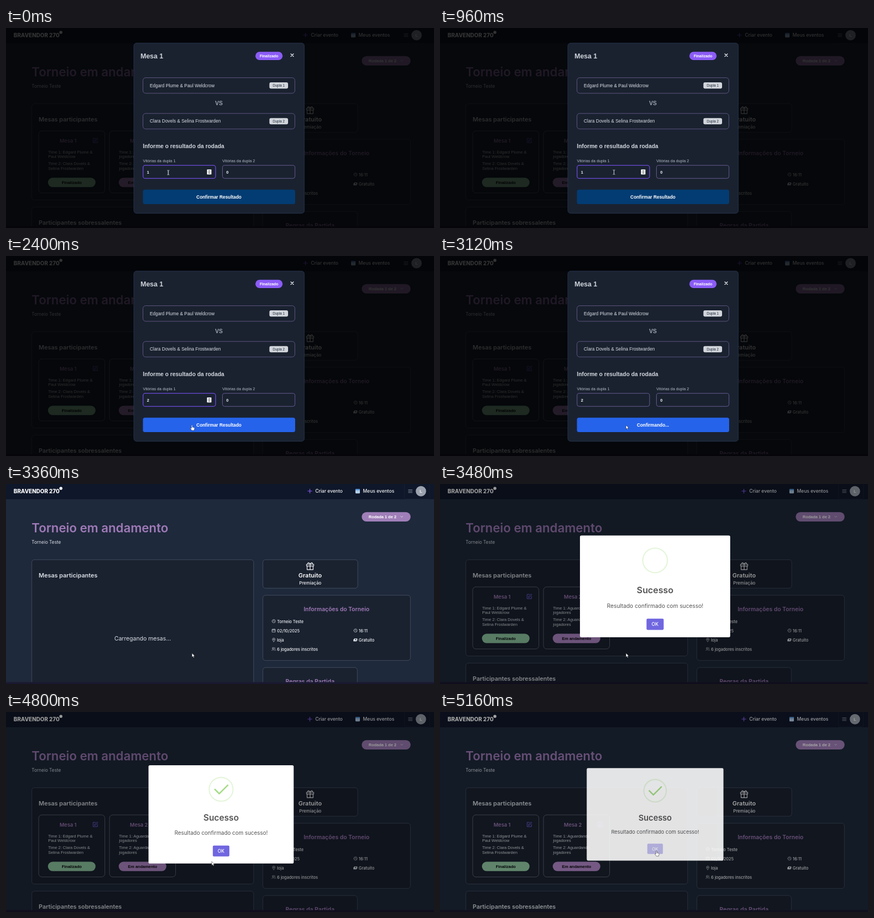
An HTML page for the animation above (5280 ms loop, 786 by 368 pixels).

```html
<!DOCTYPE html>
<html lang="pt-BR">
<head>
<meta charset="utf-8">
<title>Resultado da mesa</title>
<style>
html, body { margin: 0; width: 100%; height: 100%; overflow: hidden; background: #1e293b; }
svg { display: block; width: 100vw; height: 100vh; }
text { white-space: pre; }
.p { font-family: Inter, "Open Sans", sans-serif; }
.a { font-family: "Liberation Sans", Arial, sans-serif; }
</style>
</head>
<body>
<svg id="stage" viewBox="0 0 786 368" xmlns="http://www.w3.org/2000/svg"></svg>
<script>
const LOOP = 5280, STEP = 120;
const LOADING = 3360, READY = 3480, POP_IN = 3380, POP_OUT = 5143;
const PURPLE = '#a07ab8', CARD = '#1a2230', LINE = '#4a5568', PALE = '#dce0e6';

// Markup helpers
const rect = (x, y, w, h, r, fill, more = '') =>
  `<rect x="${x}" y="${y}" width="${w}" height="${h}" rx="${r}" fill="${fill}" ${more}/>`;
const path = (d, stroke, w = 0.8) =>
  `<path d="${d}" fill="none" stroke="${stroke}" stroke-width="${w}" stroke-linecap="round" stroke-linejoin="round"/>`;
const text = (font, s, x, y, size, weight, fill, anchor = 'start', more = '') =>
  `<text class="${font}" x="${x}" y="${y}" font-size="${size}" font-weight="${weight}" fill="${fill}" text-anchor="${anchor}" ${more}>${s.replace(/&/g, '&amp;')}</text>`;
const pop = (...args) => text('p', ...args);
const ari = (...args) => text('a', ...args);
const group = (id, body) => `<g id="${id}">${body}</g>`;
const at = (x, y, body) => `<g transform="translate(${x} ${y})">${body}</g>`;
const box = (x, y, w, h, stroke = LINE, r = 5) =>
  rect(x, y, w, h, r, CARD, `stroke="${stroke}" stroke-width=".8"`);

const teams = [['Edgard Plume', 'Paul Weldcrow'], ['Clara Dovels', 'Selina Frostwarden']];

const icons = {
  clock: path('M-3 0a3 3 0 1 0 6 0a3 3 0 1 0-6 0M0-1.6V0L1.2.7', PALE, 0.7),
  date: path('M-2.7-2.2h5.4v5h-5.4zM-2.7-.5h5.4M-1.3-3v1.2M1.3-3v1.2', PALE, 0.7),
  pin: path('M0 3.3C-4-.5-2.5-3.2 0-3.2S4-.5 0 3.3zM-.8-.7a.8.8 0 1 0 1.6 0a.8.8 0 1 0-1.6 0', PALE, 0.7),
  users: path('M-2.5-1.5a1.3 1.3 0 1 0 2.6 0a1.3 1.3 0 1 0-2.6 0M-3.4 2.5C-3.4.3 1 .3 1 2.5M1.4-2.8a1.4 1.4 0 0 1 0 2.6M2.2.8C3.2 1 3.5 1.8 3.5 2.5', PALE, 0.7),
  cash: rect(-2.6, -2.4, 6, 4, 0.6, PALE) + rect(-3.8, -1, 6, 3.8, 0.6, PALE) + '<circle cx=".4" cy="-.4" r="1.1" fill="#1a2230"/>',
  gift: path('M-6.5-3.5h13v3.3h-13zM-5.5-.2h11v6.8h-11zM0-3.5v10M0-3.5C-2-7.5-5.2-6.5-4-3.5M0-3.5C2-7.5 5.2-6.5 4-3.5', '#f3f4f6', 1.2),
  edit: path('M0-3.8h-4v8h8v-4M-1.5 1.7l.4-1.9L3.2-4.5l1.4 1.4L.4 1.3z', '#7c66f0', 0.9)
};

function header() {
  return rect(0, 0, 786, 28, 0, '#0f172a') +
    pop('BRAVENDOR 270', 14, 17.3, 10, 800, '#fff') +
    '<circle cx="100.8" cy="8" r="2.8" fill="#fff"/>' +
    group('nav',
      rect(731.5, -1, 46, 28.5, 2, 'none', 'stroke="#1a2338" stroke-width=".8"') +
      path('M554.3 13h7.4M558 9.3v7.4', '#8b5cf6', 1.2) +
      pop('Criar evento', 568, 16.2, 8.6, 500, '#f3f4f6') +
      rect(641.8, 9.3, 8, 8, 1, '#cfe3f7') + rect(641.8, 9.3, 8, 2.4, 1, '#4f8fd6') +
      path('M643.5 13.5h4.6M643.5 15.3h4.6', '#6aa5e0', 0.7) +
      pop('Meus eventos', 655.5, 16.2, 8.6, 500, '#f3f4f6') +
      path('M739 10.7h7M739 13.2h7M739 15.7h7', '#9ca3af', 0.8) +
      '<circle cx="762" cy="13.2" r="9.5" fill="#9ca3af"/>' +
      ari('L', 762, 15.9, 7.5, 700, '#f9fafb', 'middle'));
}

function table(x, n, rows, status, fill) {
  const lines = rows.map(([s, y]) => ari(s, x + 17.5, y, 7.5, 400, PALE)).join('');
  return box(x, 189.3, 121.5, 114.2, '#6b7280', 6) +
    pop('Mesa ' + n, x + 54, 210.8, 9.4, 600, PURPLE, 'middle') +
    at(x + 104, 206.8, icons.edit) + lines +
    rect(x + 17, 275.5, 87.5, 17.2, 8.6, fill) +
    ari(status, x + 60.8, 286.6, 7.5, 700, '#05070b', 'middle');
}

function tables() {
  const [[a, b], [c, d]] = teams;
  return group('tables',
    box(47.3, 139.3, 407.5, 177.2) +
    table(60, 1, [[`Time 1: ${a} &`, 230.6], [b, 239.3], [`Time 2: ${c} &`, 252.4], [d, 261.1]], 'Finalizado', '#92cca5') +
    table(190, 2, [['Time 1: Aguardando', 230.6], ['jogadores', 239.3], ['Time 2: Aguardando', 252.4], ['jogadores', 261.1]], 'Em andamento', '#b48acb') +
    box(47.3, 329.6, 407.5, 60) +
    pop('Participantes sobressalentes', 60, 362, 10.9, 600, PALE));
}

function info() {
  const row = (icon, s, x, y) => at(x, y - 3.3, icons[icon]) + pop(s, x + 6, y, 7.5, 500, '#f3f4f6');
  return box(471.7, 139.3, 174.3, 52.5) + at(558.5, 151, icons.gift) +
    pop('Gratuito', 558.5, 172, 11, 600, '#fff', 'middle') +
    pop('Premiação', 558.8, 184.6, 8, 500, '#f3f4f6', 'middle') +
    box(471.7, 204.7, 271, 120) +
    pop('Informações do Torneio', 607, 234, 10.5, 600, PURPLE, 'middle') +
    row('clock', 'Torneio Teste', 491.7, 255.7) +
    row('date', '02/10/2025', 491.7, 272.9) + row('clock', '16:11', 641.8, 272.9) +
    row('pin', 'loja', 491.7, 290) + row('cash', 'Gratuito', 641.8, 290) +
    row('users', '6 jogadores inscritos', 491.7, 307) +
    box(471.7, 337.7, 173.5, 60) +
    pop('Regras da Partida', 558.2, 367.3, 10.6, 600, PURPLE, 'middle');
}

function page() {
  return rect(0, 0, 786, 368, 0, '#1e293b') + header() +
    pop('Torneio em andamento', 47, 88.5, 22.6, 600, PURPLE) +
    pop('Torneio Teste', 47, 110.3, 8.4, 400, PALE) +
    rect(653.3, 51.7, 89.7, 17.2, 8.6, '#a07fb8') +
    ari('Rodada 1 de 2', 666, 62.8, 7.5, 700, '#fff') +
    path('M724.8 59.3l1.9 1.8l1.9-1.8', '#e5e7eb', 0.8) +
    group('loading', box(47.3, 139.3, 407.5, 250) +
      pop('Carregando mesas...', 251, 287.6, 10.6, 400, PALE, 'middle')) +
    tables() + pop('Mesas participantes', 60, 172, 11, 600, PALE) + info() +
    rect(0, 364.5, 786, 4, 0, '#1a1830');
}

function modal() {
  const team = (i, y) => box(251.5, y, 279, 28.6, '#6f6293') +
    ari(teams[i].join(' & '), 264, y + 17, 8.4, 400, PALE) +
    rect(483.7, y + 8.5, 34.3, 11.5, 3, '#d1d5db') +
    ari('Dupla ' + (i + 1), 500.8, y + 16.6, 6.3, 400, '#1f2937', 'middle');
  const field = (n, x) => ari('Vitórias da dupla ' + n, x, 246.6, 7.25, 400, '#b3bac5') +
    rect(x + 0.2, 252.7, 133.2, 24, 4, CARD, `id="field${n}" stroke="#7d6aa8" stroke-width=".8"`) +
    ari('0', x + 7.3, 267.5, 7.6, 700, '#f3f4f6', 'start', `id="value${n}"`);
  return group('modal',
    rect(0, 0, 786, 368, 0, '#000', 'fill-opacity=".8"') +
    rect(234.8, 27.8, 313, 313.2, 5, CARD, 'stroke="#2b3a55" stroke-width=".8"') +
    ari('Mesa 1', 247, 55.8, 12.5, 700, '#d1d5db') +
    rect(458, 43.8, 50, 15.3, 7.65, '#8b5cf6') +
    ari('Finalizado', 483, 53.9, 7, 700, '#fff', 'middle') +
    path('M523 47.5l5 5M528 47.5l-5 5', '#fff', 1.1) +
    team(0, 91.5) + ari('VS', 391, 142.3, 10.5, 700, '#9ca3af', 'middle') + team(1, 157.2) +
    ari('Informe o resultado da rodada', 251.3, 220.6, 10.4, 700, '#d1d5db') +
    field(1, 251.5) + field(2, 397.3) +
    group('spin', rect(369, 260.3, 8.3, 9.2, 0.8, '#f3f4f6') +
      '<path d="M371.4 263.8l1.75-1.8l1.75 1.8zM371.4 266l1.75 1.8l1.75-1.8z" fill="#333"/>' +
      path('M369.5 264.9h7.3', '#999', 0.4)) +
    rect(262.9, 260.5, 0.8, 8.5, 0, '#fff', 'id="caret"') +
    rect(251.5, 297.6, 279.5, 26.4, 3.5, '#033c73', 'id="confirm"') +
    ari('', 391, 313.6, 8.4, 700, '#fff', 'middle', 'id="label"'));
}

// The check icon is drawn in em units: a ring, two white covers, two strokes
const EM = 8.33;
function popup() {
  const bar = id => `<rect id="${id}" height=".3125" rx=".125" fill="#a5dc86"/>`;
  const ring = alpha => `<circle cx="2.5" cy="2.5" r="2.625" fill="none" stroke="#a5dc86" stroke-opacity="${alpha}" stroke-width=".25"/>`;
  return rect(0, 0, 786, 368, 0, '#000', 'id="shade"') +
    group('popup',
      rect(-133.3, -90.2, 266.6, 180.8, 2.6, '#fff') +
      `<g transform="translate(0 -46) scale(${EM}) translate(-2.5 -2.5)">
        ${ring(1)}
        <path d="M2.1-.4375h-.4135a3.75 3.75 0 0 0 0 7.5h.4135z" fill="#fff" transform="rotate(-45 1.6865 3.3125)"/>
        <path id="sweep" d="M1.875-.6875a3.75 3.75 0 0 1 0 7.5z" fill="#fff"/>
        ${ring(0.3)}${bar('tip')}${bar('long')}</g>` +
      pop('Sucesso', 0, 12, 15.7, 600, '#545454', 'middle') +
      pop('Resultado confirmado com sucesso!', 0, 38.2, 9.95, 400, '#545454', 'middle') +
      group('ok', rect(-15.2, 57.5, 30.4, 20, 2, '#7066e0') +
        pop('OK', 0, 70.6, 8.5, 500, '#fff', 'middle')));
}

function pointers() {
  const solid = d => `<path d="${d}" fill="#fff" stroke="#111" stroke-width=".5"/>`;
  return group('ibeam', path('M-1.7-4h1.2q.5 0 .5.5v7q0 .5-.5.5h-1.2M1.7-4H.5Q0-4 0-3.5v7Q0 4 .5 4h1.2', '#e5e7eb', 0.7)) +
    group('arrow', solid('M0 0v7.2l1.7-1.5L2.8 8.2l1.3-.6L3 5.2h2.3z')) +
    group('hand', solid('M-.9.3Q0-.7.9.3V3.6l3 .7Q5 4.7 4.8 6L4 9.7H-.3L-2.9 6Q-2.6 4.7-.9 5.8z'));
}

const stage = document.getElementById('stage');
stage.innerHTML = page() + modal() + popup() + pointers();
const el = {};
stage.querySelectorAll('[id]').forEach(n => el[n.id] = n);
const show = (id, on) => { el[id].style.display = on ? '' : 'none'; };
const set = (id, attrs) => { for (const k in attrs) el[id].setAttribute(k, attrs[k]); };

// Timing helpers
const clamp = v => Math.min(1, Math.max(0, v));
const mix = (a, b, k) => a + (b - a) * k;
const smooth = k => k * k * (3 - 2 * k);
function bezier(x1, y1, x2, y2) {
  const c = (p, q, u) => 3 * p * u * (1 - u) ** 2 + 3 * q * u * u * (1 - u) + u ** 3;
  return x => {
    let lo = 0, hi = 1;
    for (let i = 0; i < 24; i++) {
      const m = (lo + hi) / 2;
      if (c(x1, x2, m) < x) lo = m; else hi = m;
    }
    return c(y1, y2, lo);
  };
}
const ease = bezier(0.25, 0.1, 0.25, 1), easeIn = bezier(0.42, 0, 1, 1);

// Each key is [moment, ...values]
function keys(list, t, curve) {
  let i = 0;
  while (i < list.length - 2 && t >= list[i + 1][0]) i++;
  const [a, b] = [list[i], list[i + 1]];
  const k = curve(clamp((t - a[0]) / (b[0] - a[0])));
  return a.slice(1).map((v, j) => mix(v, b[j + 1], k));
}

// Values: top, left, width
const TIP = [[0, 1.1875, 0.0625, 0], [0.54, 1.1875, 0.0625, 0], [0.7, 2.1875, -0.375, 3.125],
  [0.84, 3, 1.3125, 1.0625], [1, 2.8125, 0.8125, 1.5625]];
const LONG = [[0, 3.375, 2.125, 0], [0.65, 3.375, 2.125, 0], [0.84, 2.1875, 1.5625, 3.4375],
  [1, 2.375, 1.5625, 2.9375]];
const SCALE = [[0, 0.7], [0.45, 1.05], [0.8, 0.95], [1, 1]];
const SWEEP = [[0, -45], [0.05, -45], [0.12, -405], [1, -405]];
const MOUSE = [[0, 298, 266], [720, 298, 266], [1200, 341, 264.5], [1319, 341, 264.5], [1920, 331, 302.5],
  [2400, 341.5, 311.3], [4440, 341.5, 311.3], [5040, 397.5, 255.5], [LOOP, 397.5, 255.5]];

function stroke(id, list, k, angle) {
  const [y, x, width] = keys(list, k, ease);
  set(id, { x, y, width, transform: `rotate(${angle} ${x + width / 2} ${y + 0.15625})` });
}

function drawModal(t) {
  const open = t < LOADING, sent = t >= 2520, typed = t >= 1320;
  show('modal', open);
  set('nav', { transform: `translate(${open ? -8 : 0} 0)` });
  if (!open) return;
  el.value1.textContent = typed ? '2' : '1';
  show('caret', typed && t < 1560);
  show('spin', !sent);
  set('field1', { stroke: sent ? '#7d6aa8' : '#6d4bdc', 'stroke-width': sent ? 0.8 : 1.3 });
  const k = ease(clamp((t - 1920) / 150));
  set('confirm', { fill: `rgb(${mix(3, 37, k)},${mix(60, 99, k)},${mix(115, 235, k)})` });
  el.label.textContent = sent ? 'Confirmando...' : 'Confirmar Resultado';
}

function drawPopup(t) {
  const on = t >= READY, age = t - POP_IN, out = ease(clamp((t - POP_OUT) / 150));
  show('shade', on);
  show('popup', on);
  if (!on) return;
  const s = out > 0 ? 1 - out / 2 : keys(SCALE, age / 300, ease)[0];
  set('popup', { transform: `translate(395 188.2) scale(${s})`, opacity: 1 - out });
  set('shade', { 'fill-opacity': 0.4 * (1 - out) });
  set('ok', { opacity: out > 0 ? 0.4 : 1 });
  set('sweep', { transform: `rotate(${keys(SWEEP, age / 4250, easeIn)[0]} 1.875 3.0625)` });
  stroke('tip', TIP, age / 750, 45);
  stroke('long', LONG, age / 750, -45);
}

function drawMouse(t) {
  const [x, y] = keys(MOUSE, t, smooth);
  const kind = t < 1320 ? 'ibeam' : t < 1920 ? '' :
    t < 2520 || (t > 4440 && y < 266 && x > 380) ? 'hand' : 'arrow';
  for (const id of ['ibeam', 'arrow', 'hand']) {
    show(id, id === kind);
    set(id, { transform: `translate(${x} ${y})` });
  }
}

function draw(t) {
  const loading = t >= LOADING && t < READY;
  show('loading', loading);
  show('tables', !loading);
  drawModal(t);
  drawPopup(t);
  drawMouse(t);
}

const start = performance.now();
function tick() {
  const t = (performance.now() - start) % LOOP;
  draw(Math.floor(t / STEP) * STEP);
  requestAnimationFrame(tick);
}
tick();
</script>
</body>
</html>
```
